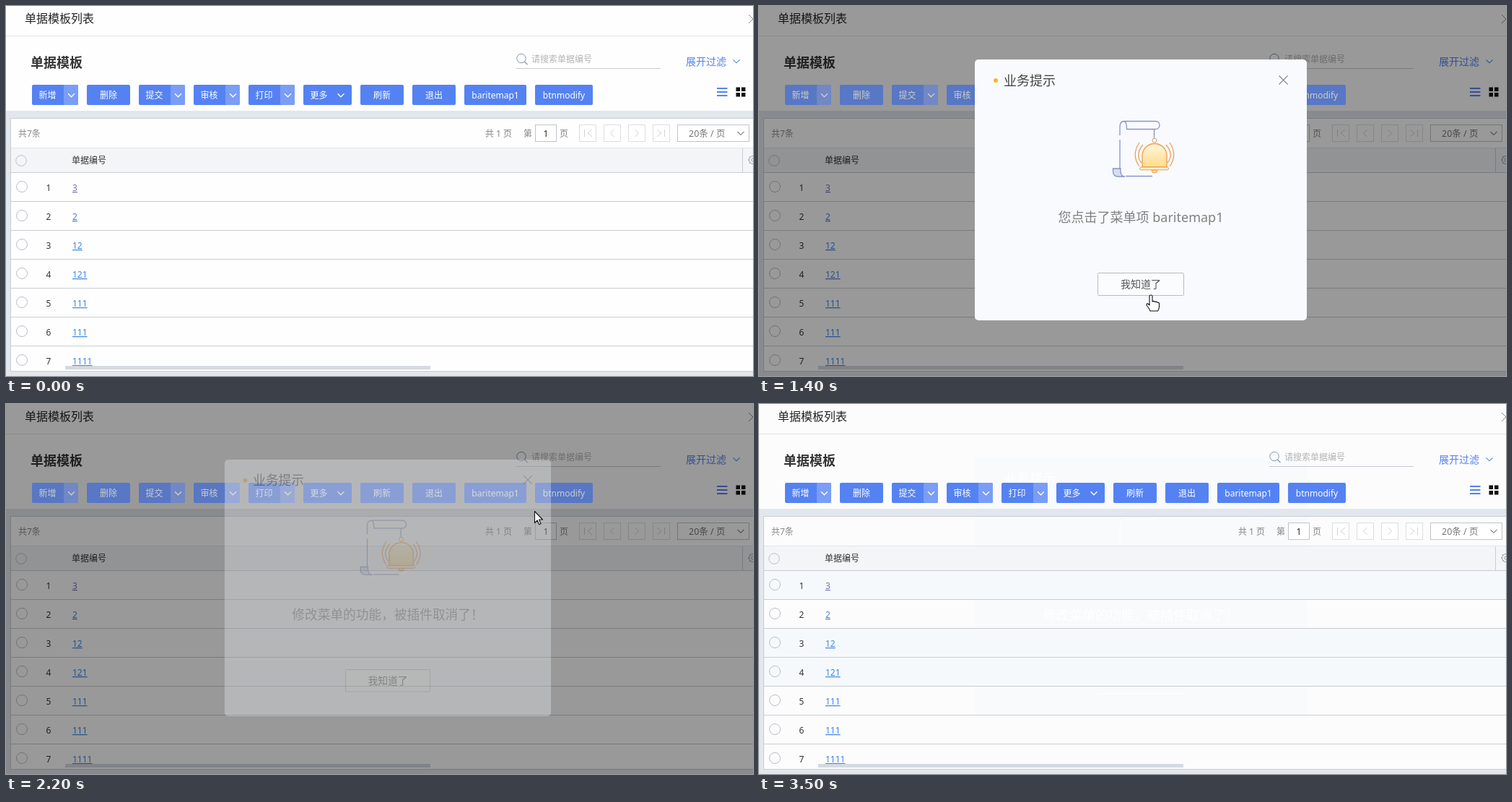
An HTML page that plays this animation: 1035x512 px, repeating every 3800 ms.

```html
<!DOCTYPE html>
<html lang="zh-CN">
<head>
<meta charset="utf-8">
<title>单据模板列表</title>
<style>
html, body { margin: 0; width: 100%; height: 100%; overflow: hidden; background: #fff; }
svg { display: block; width: 1035px; height: 512px; }
text { font-family: "Noto Sans", "Noto Sans CJK SC", sans-serif; font-size: 12px; white-space: pre; }
</style>
</head>
<body>
<svg id="stage" viewBox="0 0 1035 512" xmlns="http://www.w3.org/2000/svg"></svg>
<script>
const LOOP = 3800, STEP = 100;
const BLUE = '#5582f3', LIGHT_BLUE = '#7a9df6', LINE = '#c9cdd3';

const rect = (x, y, w, h, fill, extra = '') =>
  `<rect x="${x}" y="${y}" width="${w}" height="${h}" fill="${fill}" ${extra}/>`;
const text = (x, y, s, fill, extra = '') => `<text x="${x}" y="${y}" fill="${fill}" ${extra}>${s}</text>`;
const line = (d, stroke, width = 1, extra = '') =>
  `<path d="${d}" fill="none" stroke="${stroke}" stroke-width="${width}" ${extra}/>`;
const circle = (x, y, r, stroke, fill = 'none') =>
  `<circle cx="${x}" cy="${y}" r="${r}" stroke="${stroke}" fill="${fill}"/>`;
const chevron = (x, y, stroke, width = 1.3) => line(`M${x - 4.5} ${y - 2.2}l4.5 4.5 4.5-4.5`, stroke, width);
const box = (x, w, stroke) => rect(x + .5, 164.5, w - 1, 23, '#fff', `stroke="${stroke}"`);
const size = n => `style="font-size:${n}px"`;
const MIDDLE = 'text-anchor="middle"';

// label, x, width, kind of arrow
const buttons = [
  ['新增', 36, 64, 'split'], ['删除', 112, 60], ['提交', 184, 64, 'split'],
  ['审核', 260, 64, 'split'], ['打印', 336, 64, 'split'], ['更多', 412, 67, 'menu'],
  ['刷新', 491, 60], ['退出', 563, 60], ['baritemap1', 635, 86], ['btnmodify', 733, 80]
];
const rows = ['3', '2', '12', '121', '111', '111', '1111'];
const rowTop = i => 231 + 40 * i;

function drawBackground() {
  return rect(0, 0, 1035, 512, '#fefefe', 'id="page"') +
    rect(0, 145, 1035, 367, '#e2e6ed') +
    rect(6.5, 155.5, 1040, 350, '#fefefe', `id="panel" stroke="${LINE}"`) +
    `<g id="ghost">${rect(299, 74, 460, 71, '#f9fafc')}${rect(299, 156, 460, 279, '#f8fafc')}` +
    text(339, 110, '业务提示', '#fff', size(18)) +
    text(529, 299, '', '#fff', `id="ghostText" ${MIDDLE} ${size(18)}`) +
    line('M500 224V166q0-6 6-6H550', '#fff') + line('M472 400.5H586', '#fff') + '</g>';
}

function drawHeader() {
  const icons = [114, 119, 124].map(y => line(`M985 ${y}H999.5`, BLUE, 2)).join('') +
    [1011.5, 1019].map(x => [112.5, 120].map(y => rect(x, y, 5.5, 5.5, '#111')).join('')).join('');
  return line('M0 41.5H1035', '#e3e3e5') +
    text(26, 23, '单据模板列表', '#222', size(16)) +
    line('M1029 12l12 12M1029 24l12-12', '#99808c') +
    text(34, 85, '单据模板', '#333', 'font-weight="bold" ' + size(18)) +
    circle(714, 72.5, 6.2, '#8794ad') + line('M718.5 77l4 4', '#8794ad', 1.2) +
    text(728, 78, '请搜索单据编号', '#b3b3b5') +
    line('M707 86.5H907', '#c5c9d0') +
    text(942, 82, '展开过滤', BLUE, size(14)) + chevron(1012, 76.5, BLUE, 1.1) + icons;
}

function drawTable() {
  const arrows = ['M801.5 171v10M812 171l-6 5 6 5', 'M842.5 171l-5 5 5 5',
    'M871.5 171l5 5-5 5', 'M902 171l6 5-6 5M912.5 171v10'];
  const pager = text(17, 181, '共7条', '#8a8a8a') + text(664, 181, '共 1 页', '#858585') +
    text(717, 181, '第', '#858585') + box(733, 30, '#bfc3c9') + text(748, 181, '1', '#333', MIDDLE + size(13)) +
    text(767, 181, '页', '#858585') +
    arrows.map((d, i) => box(794 + 34 * i, 24, '#dcdee2') + line(d, '#cfd2d8')).join('') +
    box(930, 100, '#bfc3c9') + text(946, 181, '20条 / 页', '#777', size(12.5)) + chevron(1018, 176, '#777', 1.1);
  const head = rect(7, 196, 1028, 34, '#f3f5f7') + line('M7 196.5H1035', '#dfe7ec') +
    line('M7 230.5H1035M1020.5 197V230', LINE) + circle(21, 214, 7.3, '#bcc1ca') +
    text(91, 218, '单据编号', '#333') + circle(1035, 213, 5.5, '#999fad') + circle(1035, 213, 2.3, '#999fad') +
    line('M1028 213h2M1030 208l1.6 1.6M1030 218l1.6-1.6', '#999fad');
  const body = rows.map((label, i) => {
    const y = rowTop(i), link = i ? (i === 1 ? '#4f7dd0' : '#3986e8') : '#7771c0';
    return rect(7, y, 1028, i === 6 ? 34 : 39, 'none', `id="row${i}"`) +
      (i < 6 ? line(`M7 ${y + 39.5}H1035`, LINE) : '') +
      circle(22, y + 19, 7.5, '#b9bec7') + text(55.5, y + 25, i + 1, '#333') +
      text(92, y + 25, label, link, 'text-decoration="underline"');
  }).join('');
  return pager + head + body + rect(82, 498, 506, 5, '#d5dae1') + line('M7 505.5H1035', LINE);
}

function drawButton([label, x, w, arrow], i) {
  const labelX = arrow ? x + 21.5 : x + w / 2;
  return rect(x, 109, w, 28, BLUE, `rx="2" id="button${i}"`) +
    (arrow === 'split' ? rect(x + 44, 109, 20, 28, LIGHT_BLUE, 'rx="2"') : '') +
    (arrow ? chevron(x + (arrow === 'split' ? 54.5 : 52), 123.5, '#fff') : '') +
    text(labelX, 128, label, '#fff', MIDDLE);
}

function drawBell() {
  const ink = '#8794c6', orange = '#f09a4f';
  return line('M500 179V167q0-7.5 6-7.5H550a5 5.5 0 0 1 0 11H509.500q0-11-4-11M500 185V225M547.500 171V183M508 235.500H545', ink, 1.3) +
    `<path d="M490.500 225H501q-1 10.500 6 11H498q-7.500 0-7.500-7z" fill="#d7dcf1" stroke="${ink}" stroke-width="1.3"/>` +
    circle(548, 186, 3, orange, '#fff') +
    `<path d="M531 223V207a17 16.500 0 0 1 34 0V223z" fill="url(#gold)" stroke="${orange}" stroke-width="1.3"/>` +
    rect(527.5, 223, 40, 3.8, '#fff1cd', `rx="1.9" stroke="${orange}"`) +
    `<path d="M544 227a4 4 0 0 0 8 0z" fill="#ffdf92" stroke="${orange}"/>` +
    line('M527 189Q515.500 206 527 222M532 192Q520.500 206 530 217M569 189Q580.500 206 569 222M564 192Q575.500 206 566 217', orange, 1.2);
}

function drawDialog() {
  return rect(299, 74, 460, 361, '#f8fafd', 'rx="5"') +
    '<circle cx="328" cy="103" r="3" fill="#fbb62c"/>' +
    text(339, 110, '业务提示', '#444', size(18)) +
    line('M720.500 96.500l12 12M720.500 108.500l12-12', '#858585', 1.1) + drawBell() +
    text(529, 299, '', '#808080', `id="message" ${MIDDLE} ${size(18)}`) +
    rect(469.5, 369.5, 119, 31, '#fbfcfe', 'rx="1" stroke="#b9bbbf"') +
    text(529, 390, '我知道了', '#555', MIDDLE + ' ' + size(14));
}

const pointer = (id, d) =>
  `<path id="${id}" d="${d}" fill="#fff" stroke="#111" stroke-width="1.1" stroke-linejoin="round"/>`;

document.getElementById('stage').innerHTML =
  '<defs><linearGradient id="gold" x2="0" y2="1"><stop stop-color="#fff6dc"/>' +
  '<stop offset="1" stop-color="#ffdd8a"/></linearGradient></defs>' +
  drawBackground() + drawHeader() + drawTable() +
  rect(0, 0, 1035, 512, '#000', 'id="dim" opacity=".4"') +
  `<g id="buttons">${buttons.map(drawButton).join('')}</g>` +
  `<g id="dialog">${drawDialog()}</g><g id="cursor">` +
  pointer('arrow', 'M.5.5V16.500L4.200 13 6.700 18.700 9 17.700 6.600 12H11.500Z') +
  pointer('hand', 'M-2 14V2a2 2 0 0 1 4 0V9q2-1.500 3.500.5 2-1 3.300.8 2-.6 2.700 1.200V16q0 3-2 6H-1q-1-3-5-8 0-3 2-2z') + '</g>';

const $ = id => document.getElementById(id);
const show = (id, on) => $(id).setAttribute('visibility', on ? 'inherit' : 'hidden');

// time, x, y of the pointer tip
const path = [
  [100, 857, 139], [300, 790, 134], [500, 705, 126], [600, 691, 129], [800, 691, 129],
  [1100, 560, 365], [1200, 543, 385], [1400, 543, 400], [1500, 543, 400], [1600, 568, 338],
  [1800, 660, 215], [2000, 760, 124], [2100, 756, 126], [2200, 732, 148], [2400, 613, 343],
  [2700, 570, 379], [2800, 544, 384], [2900, 544, 384], [3000, 544, 383], [3100, 600, 335],
  [3200, 700, 300], [3300, 800, 235], [3400, 920, 180]
];
const handTimes = [[300, 700], [1200, 1700], [2000, 2200], [2700, 3000]];
const dialogs = [
  { open: 700, close: 1600, message: '您点击了菜单项 baritemap1' },
  { open: 2200, close: 3000, message: '修改菜单的功能，被插件取消了！' }
];

function pointerAt(t) {
  const next = path.findIndex(p => p[0] >= t);
  if (next < 1) return path[Math.max(next, 0)].slice(1);
  const [a, b] = [path[next - 1], path[next]];
  const k = (t - a[0]) / (b[0] - a[0]);
  return [a[1] + (b[1] - a[1]) * k, a[2] + (b[2] - a[2]) * k];
}

// Row highlighting lags half a step behind the pointer.
function hoveredRow(t) {
  if (t < 1600 || t > 3400) return -1;
  const y = (pointerAt(t)[1] + pointerAt(t - STEP)[1]) / 2;
  return Math.floor((y - 231) / 40);
}

function render(time) {
  const t = Math.floor((time % LOOP) / STEP) * STEP;
  const open = dialogs.find(d => t >= d.open && t < d.close);
  const closed = !open && dialogs.filter(d => t >= d.close).pop();

  show('dim', open);
  show('dialog', open);
  show('ghost', closed);
  $('buttons').style.cssText = open ? 'filter:brightness(.85);opacity:.8' : '';
  for (const id of ['page', 'panel']) $(id).setAttribute('fill', closed ? '#fcfcfd' : '#fefefe');
  if (open) {
    const [alpha, scale] = [[.3, .983], [.86, .996]][(t - open.open) / STEP] || [1, 1];
    $('message').textContent = open.message;
    $('dialog').setAttribute('opacity', alpha);
    $('dialog').setAttribute('transform', `translate(529 254.500) scale(${scale}) translate(-529 -254.500)`);
  }
  if (closed) $('ghostText').textContent = closed.message;

  const visible = t >= 100 && t <= 3400;
  const [x, y] = visible ? pointerAt(t) : [-50, -50];
  const hand = handTimes.some(([from, to]) => t >= from && t < to);
  show('cursor', visible);
  show('hand', hand);
  show('arrow', !hand);
  $('cursor').setAttribute('transform', `translate(${Math.round(x)} ${Math.round(y)})`);

  buttons.forEach(([, left, w], i) => {
    const over = !open && x >= left && x < left + w && y >= 109 && y < 137;
    $('button' + i).setAttribute('fill', over ? LIGHT_BLUE : BLUE);
  });

  const fills = {};
  for (let s = 3000; s <= t; s += STEP) fills[hoveredRow(s)] = '#f6f9fc';
  if (!open) fills[hoveredRow(t)] = t < 3000 ? '#e6f8fc' : '#f0f6fb';
  rows.forEach((_, i) => $('row' + i).setAttribute('fill', fills[i] || 'none'));
}

const start = performance.now();
function tick() {
  render(performance.now() - start);
  requestAnimationFrame(tick);
}
tick();
</script>
</body>
</html>
```
